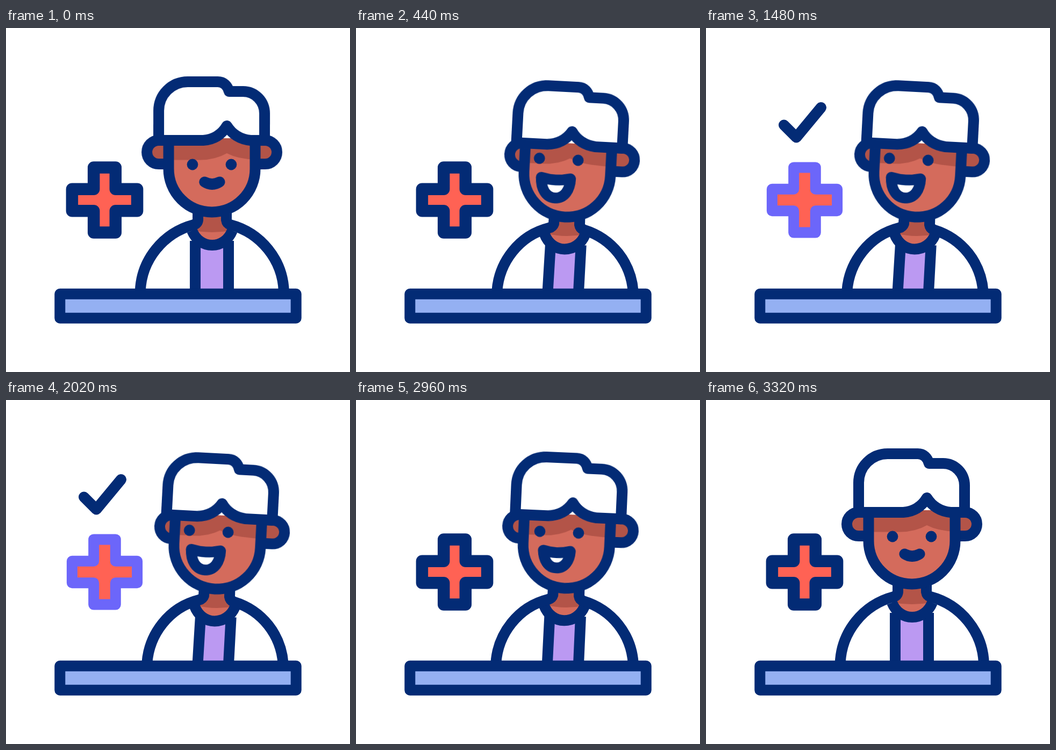
An HTML page for the animation above (3.6 s loop, 640 px wide and 640 px high).

```html
<!DOCTYPE html>
<html lang="en">
<head>
<meta charset="utf-8">
<title>Doctor at the desk</title>
<style>
  :root { --navy: #032b75; --skin: #d46b5c; --shade: #b35448; }
  html, body { margin: 0; width: 100%; height: 100%; overflow: hidden; background: #fff; }
  svg { display: block; width: 100vw; height: 100vh; }
  .line { fill: none; stroke: var(--navy); stroke-width: 20; stroke-linejoin: round; }
  .cap { stroke-linecap: round; }
  .white { fill: #fff; }
  .skin { fill: var(--skin); }
  .shade { fill: var(--shade); }
  .navy { fill: var(--navy); }

  /* --a is the resting pose, --b the leaning pose */
  .morph, .move {
    animation: morph 3600ms cubic-bezier(.333, 0, .667, 1) -20ms infinite;
  }
  .morph { d: var(--a); }
  .move { animation-name: move; }
  .head { --b: translate(14.4px, 9.5px) rotate(3deg); transform-origin: 383px 209px; }
  @keyframes morph {
    0%, 92.78%, 100% { d: var(--a); }
    12.78%, 79.44% { d: var(--b); }
  }
  @keyframes move {
    0%, 92.78%, 100% { transform: none; }
    12.78%, 79.44% { transform: var(--b); }
  }

  .sign { --on: 0; animation: blink 3600ms step-end infinite; }
  .tick { opacity: var(--on); }
  .dark { opacity: calc(1 - var(--on)); stroke-width: 22.5; }
  .lit { fill: #ff6254; stroke: #6c66fa; }
  @keyframes blink {
    0%, 33.88%, 48.33%, 63.88%, 80%, 100% { --on: 0; }
    28.33%, 33.33%, 40.55%, 47.77%, 55.55%, 71.66%, 79.44% { --on: .5; }
    28.88%, 41.11%, 56.11%, 72.22% { --on: 1; }
  }
</style>
</head>
<body>
<svg viewBox="0 0 640 640">
  <defs>
    <path id="cross" d="M163.2 259.4h40.6v40.3h40.3v40.6h-40.3v40.3h-40.6v-40.3h-40.3v-40.6h40.3z"/>
  </defs>

  <g class="sign">
    <use href="#cross" class="line lit"/>
    <use href="#cross" class="line dark"/>
    <path class="line cap tick" d="M145 180.5L168 203.5L214 148"/>
  </g>

  <g class="body">
    <path class="morph" fill="#bb99f2" style="
      --a: path('M352 400L414 400L414 492L352 492Z');
      --b: path('M361.5 405L418.5 405L414 492L356.5 492Z')"/>
    <path class="morph skin" style="
      --a: path('M357 338L410 338L410 360L421 377C414 394 400 404 383.5 404C367 404 353 394 346 377L357 360Z');
      --b: path('M369 348L416.5 348L416 368L426 385C419 402 404 411.5 388 411.5C371 411.5 357 400 350.5 383L368 366Z')"/>
    <path class="morph shade" style="
      --a: path('M357 338L410 338L410 360L418 377Q383 383 349 377L357 360Z');
      --b: path('M369 348L416.5 348L416 368L423 384Q388 391 353 382L368 366Z')"/>
    <path class="morph line" style="
      --a: path('M352 396L352 492M414 396L414 492');
      --b: path('M362 402L356.5 492M418.7 404L414 492')"/>
    <path class="morph line" style="
      --a: path('M346 377C353 394 367 404 383.5 404C400 404 414 394 421 377');
      --b: path('M350.5 383C357 400 371 411.5 388 411.5C404 411.5 419 402 426 385')"/>
    <path class="morph line cap" style="
      --a: path('M357 338L357 357Q356 364 349 366C292.3 381.1 251.8 431.4 249.7 490M410 338L410 357Q411 364 417.6 366C474.3 381.1 514.8 431.4 516.9 490');
      --b: path('M369 348L368 364Q366 370 359 372C303 386 266 436 262.3 490M416.5 348L416 366Q417 373 424 375.5C477 392 511.5 437 515.6 490')"/>
  </g>

  <g class="move head">
    <path class="move line" style="--b: translate(10.6px, 0); fill: var(--shade)"
      d="M302 209H284a22 22 0 0 0 0 44H302"/>
    <path class="move line" style="--b: translate(1px, 0); fill: var(--shade)"
      d="M464 209H482a22 22 0 0 1 0 44H464"/>

    <g class="move" style="--b: translate(-1.7px, 0)">
      <path class="skin" d="M302.5 209V262a80.5 80.5 0 0 0 161 0V209z"/>
      <path class="morph shade" style="
        --a: path('M303 205L463 205L463 244.5Q432 244 411 233Q390 245 362 245.5L303 245.5Z');
        --b: path('M303 205L463 205L463 244.5Q408 244 387 233Q366 245 338 245.5L303 245.5Z')"/>
      <path class="line" d="M302.5 209V262a80.5 80.5 0 0 0 161 0V209"/>
    </g>

    <path class="morph line white" style="
      fill: #fff;
      --a: path('M284 209L284 154C284 124 308 100 338 100L394 100C405 100 412 107 415 118L441 118C463 118 481 136 481 159L481 209L455 209Q426 206 411 182Q396 207 367 209Z');
      --b: path('M284 209L284 154C284 124 308 100 338 100L394 100C405 100 412 107 415 118L441 118C463 118 481 136 481 159L481 209L431 209Q401 206 386.3 183Q371 207 341 209Z')"/>

    <g class="move navy" style="--b: translate(-18.8px, -18.2px)">
      <circle cx="347" cy="254" r="10.4"/>
      <circle cx="419" cy="254" r="10.4"/>
    </g>
    <path class="morph line" style="
      fill: #fff;
      --a: path('M369.5 286.5Q383.5 294 397.5 286.5C393 289.5 388 291 383.5 291C379 291 374 289.5 369.5 286.5Z');
      --b: path('M333.5 271Q361 278 388 271C388 291 379 308 361 308C343 308 334 291 333.5 271Z')"/>
  </g>

  <rect class="line" style="fill: #94b0f2" x="100.3" y="494.7" width="439.4" height="45"/>
</svg>
</body>
</html>
```
